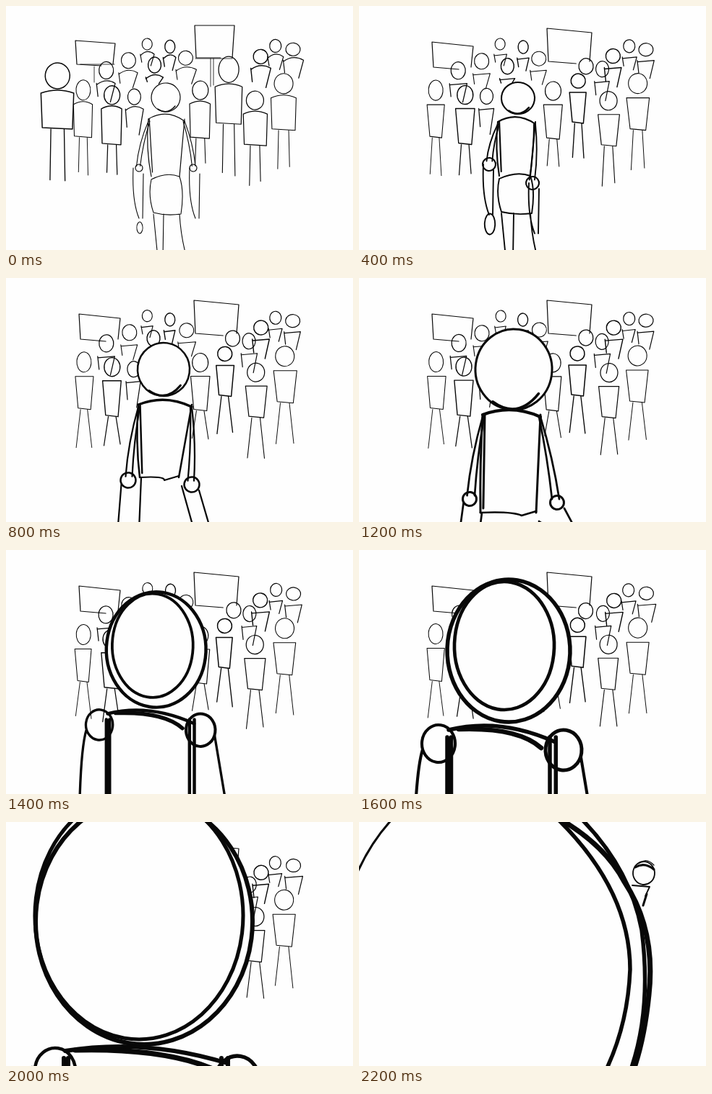
An HTML page for the animation above (2400 ms loop, 480 by 339 pixels).

```html
<!DOCTYPE html>
<html lang="en">
<head>
<meta charset="utf-8">
<title>Walking into the crowd</title>
<style>
html, body { margin: 0; width: 100%; height: 100%; overflow: hidden; background: #fefefe; }
svg { display: block; width: 100vw; height: 100vh; }
path { stroke: #080808; stroke-linecap: round; stroke-linejoin: round; }
</style>
</head>
<body>
<svg id="stage" viewBox="0 0 480 339" preserveAspectRatio="none"></svg>
<script>
const STEP = 200, STEPS = 12, FLOOR = 420, PAPER = "#fefefe";

// Head x, y, radii, torso height, leg length (0 for people in the back rows).
const crowd = [
  [107, 117, 10, 14, 46, 50], [138, 90, 10, 12, 26, 0], [146, 123, 11, 13, 50, 42],
  [177, 126, 9, 11, 36, 0], [170, 76, 10, 11, 21, 0], [196, 53, 7, 8, 16, 0],
  [205, 83, 9, 11, 9, 0], [227, 57, 7, 9, 18, 0], [249, 73, 10, 10, 20, 0],
  [268, 118, 11, 13, 48, 38], [352, 70, 10, 10, 27, 0], [373, 56, 8, 9, 18, 0],
  [397, 60, 10, 9, 25, 0], [385, 108, 13, 14, 45, 54], [345, 132, 12, 13, 44, 53]
];
const early = [[72, 96, 17, 18, 50, 72], [309, 89, 14, 18, 52, 68]];
const late = [[303, 105, 10, 10, 43, 50], [314, 84, 10, 11, 0, 0], [337, 88, 9, 11, 27, 0]];

const pose = (pen, head, shoulders, hips, hands, grip) => ({ pen, head, shoulders, hips, hands, grip });
const poses = {
  0: pose(1.2, [221, 127, 20, 20], [197, 247, 157], [201, 240, 237], [184, 225, 259, 225], 5),
  2: pose(2.1, [220, 128, 23, 22], [192, 244, 161], [194, 237, 236], [180, 220, 240, 246], 9),
  4: pose(2.5, [218, 127, 36, 37], [183, 257, 176], [185, 239, 277], [169, 281, 257, 287], 10.5),
  6: pose(3, [214, 127, 53, 56], [171, 251, 190], [168, 245, 326], [153, 307, 274, 312], 9.5),
  8: pose(5.5, [207, 140, 85, 99], [124, 266, 250], [123, 267, FLOOR], [110, 269, 283, 278], 24),
  9: pose(5, [198, 120, 100, 116], [98, 274, 244], [94, 274, FLOOR], [80, 256, 298, 284], 27),
  10: pose(6, [191, 138, 150, 171], [82, 300, 318], [80, 300, FLOOR], [68, 345, 320, 358], 29)
};
const looseRings = { 8: [201, 133, 69, 89], 9: [193, 112, 103, 124], 10: [184, 130, 144, 172] };

const noise = (a, b) => {
  const n = Math.sin(a * 12.99 + b * 78.23) * 43758.5;
  return n - Math.floor(n);
};
const mix = (a, b) => Array.isArray(a) ? a.map((v, i) => mix(v, b[i])) : (a + b) / 2;
const stroke = (width, d, fill = "none") =>
  `<path d="${d}" stroke-width="${width}" fill="${fill}"${width ? "" : ' style="stroke:none"'}/>`;

const oval = (x, y, rx, ry) => {
  const dx = rx * 0.6, dy = ry * 0.8;
  const half = sign => `a${rx} ${ry} 0 1 1 ${2 * dx * sign} ${2 * dy * sign}`;
  return `M${x - dx} ${y - dy}${half(1)}${half(-1)}`;
};

function person([px, py, rx, ry, tall, legs], step, id) {
  const wobble = (k, size) => (noise(id + k * 7, step) - 0.5) * size;
  const x = px + wobble(1, 2), y = py + wobble(2, 2);
  const opening = step < 2, w = rx * (opening ? 2.7 : 2.4);
  const pen = 1 + noise(id, 3) * 0.5;
  const top = y + ry + 6, low = top + tall;
  const left = x - w / 2, right = x + w / 2 + wobble(3, 3);
  const arc = opening ? `Q${x} ${top - 8} ` : "L";
  let d = oval(x, y, rx, ry);
  if (tall && !legs) {
    d += `M${left} ${top + 2}${arc}${right} ${top}L${right - w * 0.25} ${low}M${left} ${top}L${left + 2} ${top + tall * 0.7}`;
  }
  if (!legs) return stroke(pen, d);

  const inset = w * (opening ? 0.04 : 0.16);
  d += `M${left} ${top}${arc}${right} ${top}L${right - inset} ${low}L${left + inset} ${low - 2}L${left} ${top}`;
  const splay = opening ? 2 : step < 3 ? 5 : 10, foot = low + legs;
  const leg = side => `M${x + side * w * 0.2} ${low}L${x + side * (w * 0.2 + splay * 0.6)} ${foot + wobble(4 + side, 8)}`;
  return stroke(pen, d) + stroke(pen * 0.9, leg(-1) + leg(1));
}

function banner(x, y, w, h, drop) {
  return stroke(1.2, `M${x + w - 3} ${y + h}L${x + w} ${y + drop}L${x} ${y}L${x + 2} ${y + h}L${x + w * 0.65} ${y + h + drop / 2}`);
}

function background(step) {
  const extra = step < 2 ? early : late;
  const posts = step < 2 ? stroke(0.8, "M122 84V106M283 73V112M287 73V110M103 81H150M262 73H313") : "";
  const signs = step < 2
    ? banner(96, 48, 55, 33, 4) + banner(261, 27, 55, 45, 0)
    : banner(101, 50, 57, 35, 6) + banner(260, 31, 62, 46, 6);
  return signs + posts + crowd.concat(extra).map((p, i) => person(p, step, i + 1)).join("");
}

function poseAt(step) {
  if (poses[step]) return poses[step];
  const a = poses[step - 1], b = poses[step + 1];
  return Object.fromEntries(Object.keys(a).map(key => [key, mix(a[key], b[key])]));
}

function head([x, y, rx, ry], pen, step) {
  const chin = `M${x - rx * 0.55} ${y + ry * 0.8}Q${x + rx * 0.1} ${y + ry * 1.25} ${x + rx * 0.65} ${y + ry * 0.6}`;
  const loose = looseRings[step];
  return stroke(pen, oval(x, y, rx, ry), PAPER) +
    (loose ? stroke(pen * 0.85, oval(...loose)) : stroke(pen * 1.2, chin));
}

function walker({ pen, head: face, shoulders: [sl, sr, sy], hips: [hl, hr, hy], hands: [lx, ly, rx, ry], grip }, step) {
  const mid = (sl + sr) / 2;
  const sides = `M${sl} ${sy}Q${sl - 4} ${(sy + hy) / 2} ${hl} ${hy}M${sr} ${sy}L${hr} ${hy}`;
  const double = `M${sl + pen} ${sy}L${hl + pen * 1.3} ${hy - 6}`;
  const arm = (x, hx, y, out) =>
    `M${x} ${sy + 3}Q${(x + hx) / 2 + out} ${(sy + y) / 2} ${hx + out / 2} ${y - grip / 2}`;
  let limbs = arm(sl, lx, ly, -7) + arm(sl + 2, lx + pen * 3, ly, -4) +
    arm(sr, rx, ry, 6) + arm(sr - 2, rx - pen * 3, ry, 4);
  if (step < 3) {
    const shin = hy + 52, reach = 70;
    const fore = (x, y) => `M${x - 8} ${y}Q${x - 10} ${y + 45} ${x} ${y + reach}M${x + 6} ${y + 8}L${x + 5} ${y + reach}`;
    limbs += fore(lx, ly) + fore(rx + 3, ry) + oval(lx + 1, ly + reach + 13, grip * 0.8, grip * 1.6);
    limbs += `M${hl} ${hy + 4}Q${mid} ${hy - 7} ${hr} ${hy}Q${hr + 7} ${hy + 20} ${hr + 2} ${shin}Q${mid} ${shin + 3} ${hl + 3} ${shin - 2}Q${hl - 5} ${hy + 26} ${hl} ${hy + 4}`;
    limbs += `M${hl + 3} ${shin}L${hl + 9} 350M${mid - 4} ${shin}L${mid - 5} 350M${hr} ${shin}Q${hr + 2} 322 ${hr + 10} 350`;
  } else {
    const down = (x, y, lean) => `M${x} ${y}L${x + lean} 350`;
    limbs += `M${hl} ${hy}Q${mid} ${hy - 2} ${hr - 20} ${hy + 4}L${hr} ${hy - 2}`;
    limbs += down(lx - grip + 1, ly + 6, -5) + down(hl + 2, hy, -3) + down(hr + 4, hy + 12, 17) + down(rx + 10, ry + 8, 16);
  }
  return stroke(0, `M${sl} ${sy}L${sr} ${sy}L${hr} ${hy}L${hl} ${hy}Z`, PAPER) + head(face, pen, step) +
    stroke(pen, sides + double) + stroke(pen * 0.9, limbs) +
    stroke(pen * (step > 2 ? 1.4 : 1), `M${sl} ${sy}Q${mid} ${sy - 15} ${sr} ${sy + 3}`) +
    stroke(pen, oval(lx, ly, grip, grip) + oval(rx, ry, grip, grip));
}

function closeUp({ pen, head: face, shoulders: [sl, sr, sy], hands: [lx, ly, rx, ry], grip }, step) {
  const lines = [sl, sl + pen, sr, sr + pen * 1.5].map(x => `M${x - 2} ${sy + 10}V${FLOOR}`).join("");
  const arms = `M${lx - grip + 2} ${ly + 8}Q${lx - grip - 8} 310 ${lx - grip - 10} ${FLOOR}M${rx + grip} ${ry + 10}L${rx + grip + 22} ${FLOOR}`;
  const mid = (sl + sr) / 2;
  return stroke(0, `M${sl} ${sy}L${sr} ${sy}V${FLOOR}H${sl}Z`, PAPER) + head(face, pen, step) +
    stroke(pen, `M${sl} ${sy}Q${mid} ${sy - 18} ${sr + 6} ${sy + 17}`) +
    stroke(pen * 1.2, `M${sl + 14} ${sy - 1}Q${mid + 25} ${sy - 4} ${sr - 14} ${sy + 25}`) +
    stroke(pen, lines) + stroke(pen * 0.75, arms + oval(lx, ly, grip - 1, grip + 2)) +
    stroke(pen * 0.9, oval(rx, ry, grip + 1, grip + 4));
}

function passing() {
  const bystander = stroke(1.8, oval(394, 71, 15, 16) + "M378 88L402 90L396 103") +
    stroke(3, "M382 63Q395 55 408 66M398 100L393 116") + stroke(1.2, "M388 57Q398 49 408 60");
  return bystander + stroke(3, "M-4 74Q15 30 45 -3") +
    stroke(5.5, "M275 -4Q375 95 375 205Q372 280 342 344M308 -4Q375 65 391 150Q405 260 376 344") +
    stroke(7, "M278 -4Q340 32 367 83Q411 150 401 240Q395 300 380 344");
}

function scene(step) {
  if (step === STEPS - 1) return passing();
  if (step === 7) {
    return background(step) + `<g transform="translate(40 25) scale(.81)">${closeUp(poses[8], 8)}</g>`;
  }
  const figure = step < 7 ? walker : closeUp;
  return background(step) + figure(poseAt(step), step);
}

const stage = document.getElementById("stage");
const start = performance.now();
let shown = -1;

function draw(now) {
  const step = Math.floor(Math.max(0, now - start) / STEP) % STEPS;
  if (step !== shown) stage.innerHTML = scene(shown = step);
  requestAnimationFrame(draw);
}
draw(start);
</script>
</body>
</html>
```
